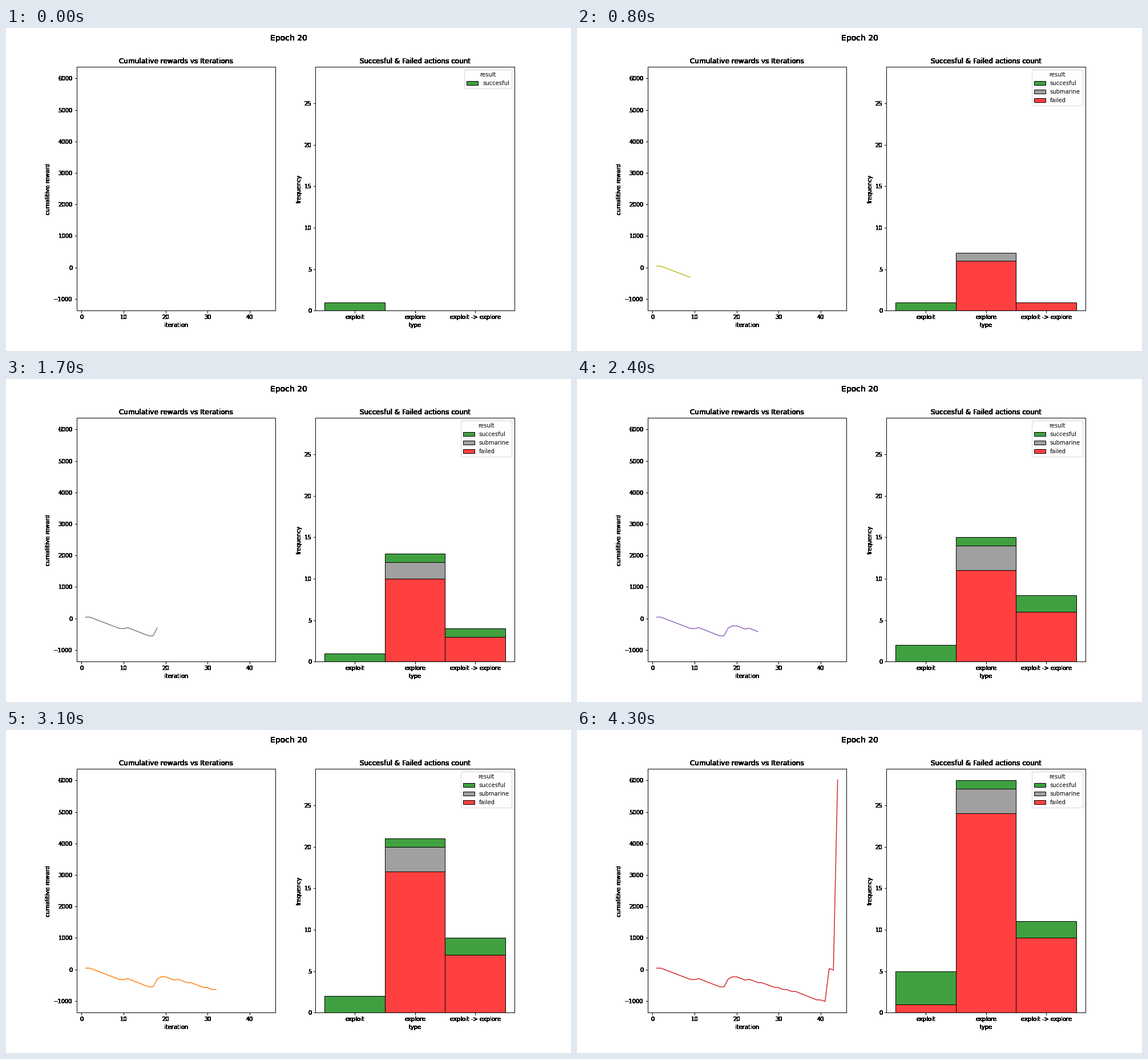
A matplotlib script that plays this animation: 990 px wide and 566 px high, repeating every 4400 ms.

```python
import numpy as np
import matplotlib.pyplot as plt
from matplotlib.animation import FuncAnimation
from matplotlib.patches import Patch

STEPS = 44
plt.rcParams.update({"font.family": "DejaVu Sans", "font.size": 10})

# One digit / letter per iteration: action type and its result.
KINDS = "0121111111" "2212111101" "1222211211" "1110111221" "1010"
RESULTS = "guffffffff" "gfffffuggu" "ffgfffffff" "ffffffffff" "fgfg"
TYPES = ["exploit", "explore", "exploit -> explore"]
STYLES = {
    "g": ("succesful", ("green", 0.75)),
    "u": ("submarine", ("gray", 0.75)),
    "f": ("failed", ("red", 0.75)),
}

# Corners of the piecewise linear cumulative reward.
CORNERS = np.array([
    (1, 40), (2, 40), (9, -317), (10, -325), (11, -293), (16, -553),
    (17, -553), (18, -305), (19, -235), (20, -235), (22, -339), (23, -312),
    (25, -416), (26, -421), (29, -571), (30, -579), (31, -634), (32, -642),
    (33, -694), (34, -700), (39, -965), (40, -970), (41, -1020), (42, 30),
    (43, -20), (44, 6020),
])
iterations = np.arange(1, STEPS + 1)
rewards = np.interp(iterations, *CORNERS.T)

fig = plt.figure(figsize=(990 / 72, 566 / 72), dpi=72, facecolor="white")


def harden(img, dpi):
    """Look of the same antialiased ink laid down many times."""
    img[..., :3] = 0
    img[..., 3] = 1 - (1 - img[..., 3]) ** 30
    return img, 0, 0


def make_panel(col, title, xlabel, ylabel, xlim, ylim):
    """Hard-edged frame with labels, plus a clean layer for the data."""
    width = 0.775 / 2.2
    box = [0.125 + col * 1.2 * width, 0.125, width, 0.755]
    frame = fig.add_axes(box, facecolor="none", label=f"frame{col}")
    frame.set(title=title, xlabel=xlabel, ylabel=ylabel, xlim=xlim, ylim=ylim)
    frame.set_agg_filter(harden)
    layer = fig.add_axes(box, label=f"layer{col}")
    layer.set(xlim=xlim, ylim=ylim)
    layer.set_axis_off()
    return frame, layer


fig.suptitle("Epoch 20", fontsize=14).set_agg_filter(harden)
left, plot = make_panel(0, "Cumulative rewards vs Iterations", "iteration",
                        "cumalitive reward", (-1.15, 46.15), (-1372, 6372))
left.set_xticks(range(0, 41, 10))
left.set_yticks(range(-1000, 6001, 1000))
right, bars = make_panel(1, "Succesful & Failed actions count", "type",
                         "frequency", (-0.65, 2.65), (0, 29.4))
right.set_xticks(range(3), TYPES)
right.set_yticks(range(0, 26, 5))

line, = plot.plot([], [], lw=1.5)
stacks = {
    key: bars.bar(range(3), 0, width=1, facecolor=STYLES[key][1],
                  edgecolor="black", linewidth=1)
    for key in "fug"
}


def update(i):
    n = i + 1
    line.set_data(iterations[:n], rewards[:n])
    line.set_color(f"C{i % 10}")

    events = list(zip(KINDS[:n], RESULTS[:n]))
    base = [0, 0, 0]
    for key, group in stacks.items():
        for k, rect in enumerate(group):
            count = events.count((str(k), key))
            rect.set_y(base[k])
            rect.set_height(count)
            rect.set_visible(count > 0)
            base[k] += count

    handles = [Patch(facecolor=color, edgecolor="black", linewidth=1, label=name)
               for key, (name, color) in STYLES.items() if key in RESULTS[:n]]
    bars.legend(handles=handles, title="result", loc="upper right")
    return []


anim = FuncAnimation(fig, update, frames=STEPS, interval=100,
                     repeat=True, repeat_delay=0, blit=False)
plt.show()
```
